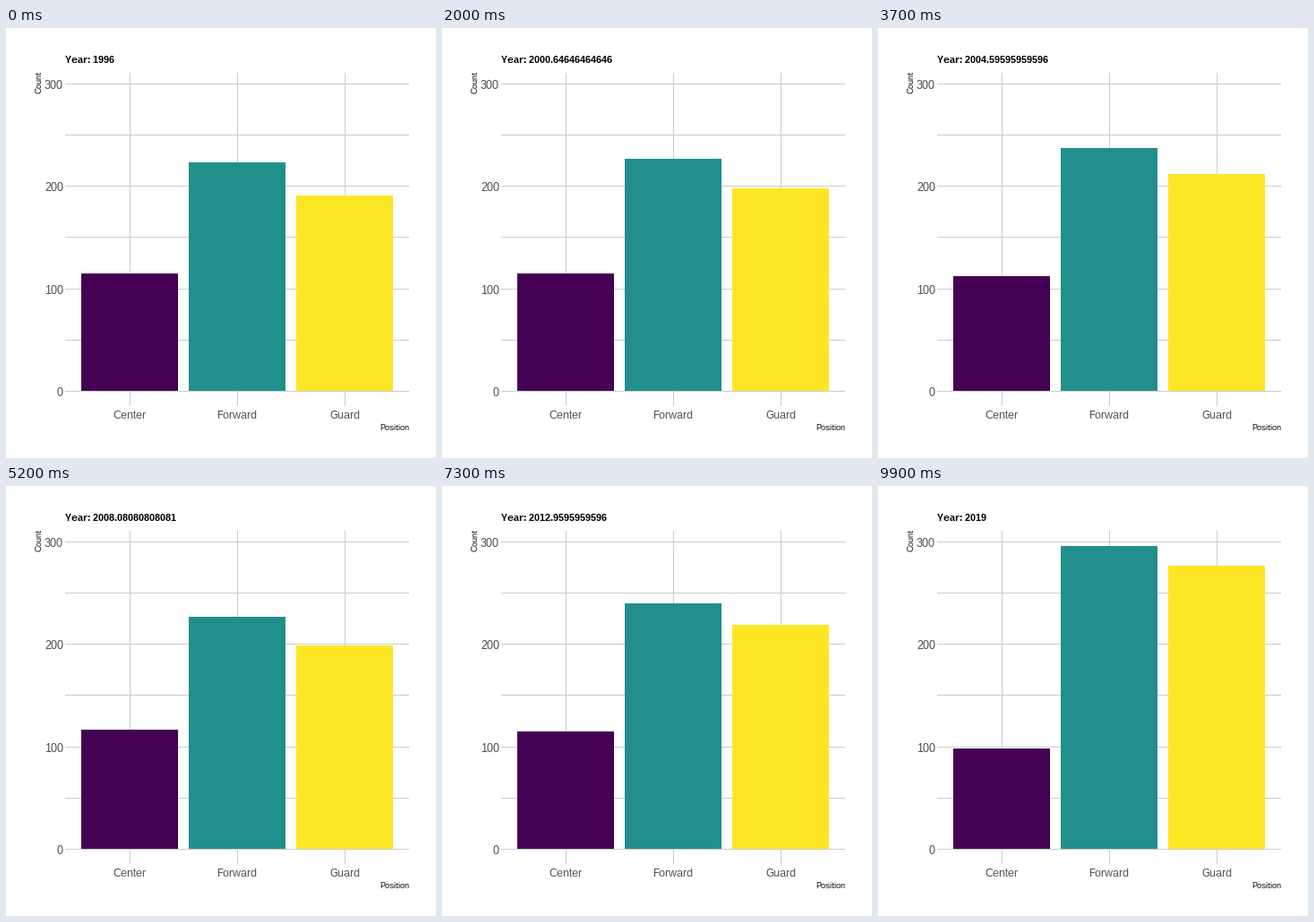
These frames come from a looping animation (480 px wide and 480 px high, 10000 ms). A matplotlib script:

```python
import numpy as np
import matplotlib.pyplot as plt
from matplotlib.animation import FuncAnimation
from matplotlib.patches import Rectangle

plt.rcParams.update({
    "font.family": "Liberation Sans",
    "text.hinting": "native",
    "text.hinting_factor": 1,
})

SIZE, FRAMES = 480, 100
FIRST, LAST = 1996, 2019
ZERO, UNIT = 405.4, 1.1433          # baseline row, pixels per player
LEFT, RIGHT, TOP, BOTTOM = 66, 450, 50, 422
GRID, TICK = "#CCCCCC", "#4D4D4D"

# Turning points of the counts, joined by straight lines
TURNS = np.array([1996, 1999, 2001, 2005, 2008, 2010, 2013, 2016, 2019])
SERIES = {
    "Center": ("#440154", [115, 102, 118.7, 111, 116.6, 104, 115, 102.5, 98.5]),
    "Forward": ("#21908C", [223, 218, 229.6, 238, 227, 229, 240, 250.8, 296]),
    "Guard": ("#FDE725", [191, 185, 201.7, 213.4, 199, 203, 219, 222.6, 277]),
}
keys = np.round((TURNS - FIRST) * (FRAMES - 1) / (LAST - FIRST))

fig = plt.figure(figsize=(SIZE / 72, SIZE / 72), dpi=72, facecolor="white")
ax = fig.add_axes([0, 0, 1, 1])
ax.set(xlim=(0, SIZE), ylim=(SIZE, 0))
ax.axis("off")


def box(x, y, w, h, color, z=1):
    return ax.add_patch(Rectangle((x, y), w, h, fc=color, lw=0,
                                  antialiased=False, zorder=z))


def label(x, y, s, size, color="black", va="baseline", **kw):
    return ax.text(x, y, s, fontsize=size, color=color, va=va, **kw)


def height(value):
    return ZERO - value * UNIT


for v in range(0, 301, 50):
    y = int(height(v))
    box(LEFT, y, RIGHT - LEFT, 1, GRID)
    if v % 100 == 0:
        label(64, y + 6, str(v), 12.5, TICK, ha="right")

bars = []
for n, (name, (color, counts)) in enumerate(SERIES.items()):
    x = 138 + 120 * n
    box(x, TOP, 1, BOTTOM - TOP, GRID)
    label(x, 436, name, 12.4, TICK, ha="center")
    bars.append((box(x - 54, TOP, 108, 1, color, 2), counts))

label(RIGHT, 449, "Position", 9.3, ha="right")
label(41, TOP - 2, "Count", 9.3, va="top", ha="right", rotation=90)
title = label(LEFT, 39, "", 11, weight="bold")


def update(i):
    year = FIRST + (LAST - FIRST) * i / (FRAMES - 1)
    title.set_text(f"Year: {year:.15g}")
    for bar, counts in bars:
        top = round(height(np.interp(i, keys, counts)))
        bar.set_y(top)
        bar.set_height(int(ZERO) - top)
    return [title] + [bar for bar, _ in bars]


anim = FuncAnimation(fig, update, frames=FRAMES, interval=100,
                     repeat=True, repeat_delay=0, blit=False)
plt.show()
```
